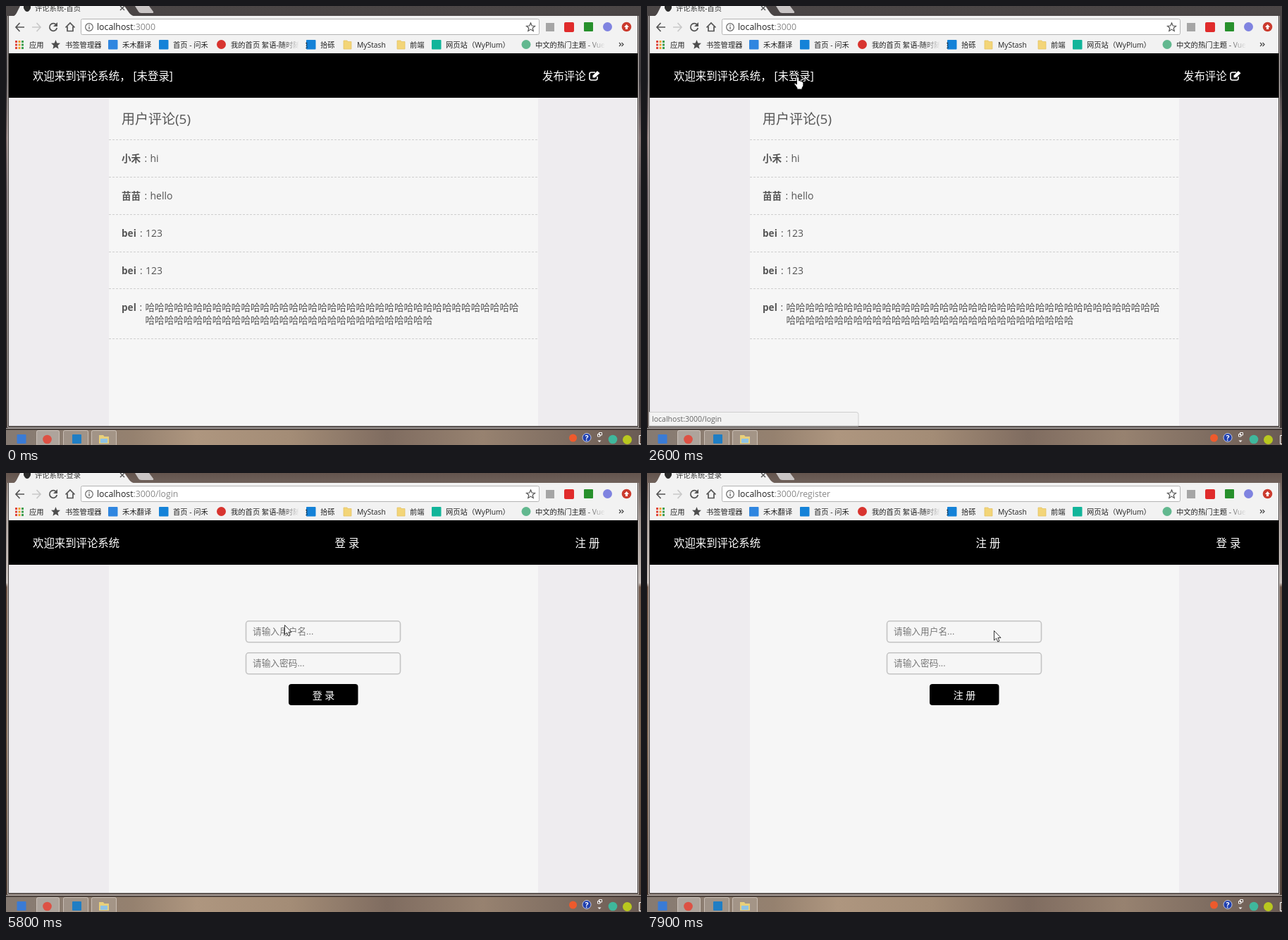
Animation of 901x622 px, one loop 8000 ms. Source, as an HTML page:

```html
<!DOCTYPE html>
<html lang="zh">
<head>
<meta charset="utf-8">
<style>
html, body { margin: 0; width: 100%; height: 100%; overflow: hidden; background: #4a423e; }
svg { display: block; width: 901px; height: 622px; }
text { font-family: 'Open Sans', 'Noto Sans CJK SC', 'Noto Sans CJK', sans-serif; white-space: pre; }
.bm { font-size: 10.3px; fill: #222; }
.head { font-size: 15.4px; fill: #fff; }
.list { font-size: 13.6px; fill: #555; }
.hint { font-size: 12.7px; fill: #777; }
.ico { fill: none; stroke: #555; stroke-width: 1.7; }
.mid { text-anchor: middle; }
</style>
</head>
<body>
<svg viewBox="0 0 901 622">
  <defs>
    <linearGradient id="sky1" x2="0" y2="1">
      <stop offset="0" stop-color="#4b4646"/><stop offset=".17" stop-color="#3d3a3d"/>
      <stop offset=".3" stop-color="#80706f"/><stop offset=".42" stop-color="#5e5457"/>
      <stop offset=".7" stop-color="#47403f"/><stop offset="1" stop-color="#3a3230"/>
    </linearGradient>
    <linearGradient id="sky2" x2="0" y2="1">
      <stop offset="0" stop-color="#63544d"/><stop offset=".1" stop-color="#9a8f8a"/>
      <stop offset=".25" stop-color="#c5bcb8"/><stop offset=".26" stop-color="#6b5447"/>
      <stop offset=".6" stop-color="#75604f"/><stop offset="1" stop-color="#4a3b33"/>
    </linearGradient>
    <linearGradient id="bar">
      <stop offset="0" stop-color="#857a72"/><stop offset=".2" stop-color="#95816f"/>
      <stop offset=".3" stop-color="#ae967f"/><stop offset=".45" stop-color="#a38c76"/>
      <stop offset=".6" stop-color="#7f6c60"/><stop offset=".75" stop-color="#978270"/>
      <stop offset="1" stop-color="#6a5b54"/>
    </linearGradient>
    <linearGradient id="fade">
      <stop offset="0" stop-color="#f2f2f2" stop-opacity="0"/><stop offset="1" stop-color="#f2f2f2"/>
    </linearGradient>
  </defs>

  <rect id="wall" width="901" height="622"/>

  <!-- window frame and tabs -->
  <path d="M3.500 14V595.500H896.500V14" fill="none" stroke="#3a3432"/>
  <path d="M2.500 14V597H897.500V14" fill="none" stroke="#e6e1de" stroke-opacity=".75"/>
  <path d="M9 15Q13 14 15 10L20 0H168L175 10Q178 14 184 15Z" fill="#f2f2f2"/>
  <path d="M183 0H203L209 8Q210 10 207 10H192Q189 10 188 8Z" fill="#c9c5c5"/>
  <path id="favicon" d="M25 0H35V3Q33 8 30 8Q27 8 25 3Z" fill="#2b2b2b"/>
  <path id="spin" d="M30 -2A5 5 0 1 1 25 3" fill="none" stroke="#4a7fd6" stroke-width="2"/>
  <text id="tab" x="41" y="6.800" font-size="10.3" fill="#333"></text>
  <path d="M162 0L168 6M168 0L162 6" stroke="#555" stroke-width="1.4"/>

  <!-- toolbar -->
  <rect x="4" y="14" width="892" height="53" fill="#f2f2f2"/>
  <rect x="106.5" y="18.5" width="650" height="22" rx="2" fill="#fff" stroke="#b3b3b3"/>
  <path class="ico" d="M26 30H14M19.500 24L14 30L19.500 36"/>
  <path class="ico" d="M37 30H49M43.500 24L49 30L43.500 36" style="stroke:#c9c9c9"/>
  <g id="reload"><path class="ico" d="M71.500 27A5.300 5.300 0 1 0 72.300 31"/><path d="M73 23V29H67Z" fill="#555"/></g>
  <path id="stop" class="ico" d="M62 25L72 35M72 25L62 35"/>
  <path class="ico" d="M84.500 30.500L91 24L97.500 30.500M87 29V35.500H95V29"/>
  <circle cx="118" cy="30" r="5.300" fill="none" stroke="#666" stroke-width="1.200"/>
  <path d="M118 29V33M118 26.500V28" stroke="#666" stroke-width="1.300"/>
  <text x="129" y="34" font-size="12.3" fill="#222">localhost<tspan id="url" fill="#888"></tspan></text>
  <path d="M744.500 24L746.200 28L750.500 28.400L747.200 31.200L748.200 35.400L744.500 33.100L740.800 35.400L741.800 31.200L738.500 28.400L742.800 28Z" fill="none" stroke="#555" stroke-width="1.200"/>
  <rect x="766" y="24" width="12" height="12" fill="#a5a5a5"/>
  <rect x="792" y="23" width="14" height="14" rx="2" fill="#e02b2b"/>
  <rect x="820" y="23" width="13" height="13" rx="1" fill="#27902c"/>
  <circle cx="853.500" cy="29.500" r="6.500" fill="#7f83e0"/>
  <circle cx="880.500" cy="29.500" r="6.800" fill="#cb3b2e"/>
  <path d="M880.500 26L884 30H882V33H879V30H877Z" fill="#fff"/>

  <!-- bookmarks -->
  <g id="apps"></g>
  <path d="M70.500 48L72.300 52.500L77 52.800L73.400 56L74.600 60.700L70.500 58.200L66.400 60.700L67.600 56L64 52.800L68.700 52.500Z" fill="#4d4d4d"/>
  <g id="marks"></g>
  <rect x="392" y="46" width="24" height="19" fill="url(#fade)"/>
  <rect x="415" y="46" width="10" height="19" fill="#f2f2f2"/>
  <rect x="822" y="46" width="28" height="19" fill="url(#fade)"/>
  <rect x="849" y="46" width="16" height="19" fill="#f2f2f2"/>
  <path d="M870 52L872.500 54.500L870 57M873.500 52L876 54.500L873.500 57" fill="none" stroke="#444" stroke-width="1.200"/>

  <!-- page -->
  <rect x="4" y="130" width="892" height="465" fill="#eeecef"/>
  <rect x="146" y="130" width="609" height="465" fill="#f6f6f6"/>
  <rect x="4" y="67" width="892" height="63"/>
  <text class="head" x="38" y="104.500">欢迎来到评论系统<tspan id="guest">， [未登录]</tspan></text>

  <g id="home">
    <text class="head" x="761" y="104.500">发布评论</text>
    <path d="M836 94H830.500Q828 94 828 96.500V102.500Q828 105 830.500 105H836.500Q839 105 839 102.500V100" fill="none" stroke="#fff" stroke-width="1.600"/>
    <path d="M832.500 101.500V98.500L839 92L842.500 95.200L835.700 101.500Z" fill="#fff"/>
    <text x="164" y="167" font-size="19" fill="#555">用户评论(5)</text>
    <g id="rows"></g>
  </g>

  <g id="form">
    <text id="title" class="head mid" x="484" y="104.500"></text>
    <text id="other" class="head mid" x="825" y="104.500"></text>
    <g fill="#f6f6f6" stroke="#c4c4c4" stroke-width="1.600">
      <rect x="340.500" y="209.800" width="219" height="30" rx="4"/>
      <rect x="340.500" y="254.800" width="219" height="30" rx="4"/>
    </g>
    <text class="hint" x="350" y="229">请输入用户名...</text>
    <text class="hint" x="350" y="274">请输入密码...</text>
    <rect id="caret" x="350" y="217" width="1" height="15"/>
    <rect x="401" y="299" width="98.500" height="30" rx="4"/>
    <text id="send" class="mid" x="450.500" y="319.500" font-size="14" fill="#fff"></text>
  </g>

  <g id="status">
    <path d="M3.500 595V575.500H297Q300 575.500 300 578.500V595Z" fill="#f2f2f2" stroke="#cfcfcf"/>
    <text id="link" x="7" y="589" font-size="10.550" fill="#666"></text>
  </g>

  <!-- taskbar -->
  <rect y="600" width="901" height="22" fill="url(#bar)"/>
  <path d="M0 598.500H901" stroke="#e6e1de" stroke-opacity=".7"/>
  <path d="M0 600H901" stroke="#2e2724"/>
  <g id="tasks"></g>
  <rect x="15.500" y="607" width="13" height="13" rx="1" fill="#3a7bd5"/>
  <circle cx="58.500" cy="614" r="6.300" fill="#dd5144"/>
  <rect x="94" y="607" width="13" height="13" rx="1" fill="#1f7ec4"/>
  <path d="M132 608H138L139.500 610H146V620H132Z" fill="#e8cf7a"/>
  <rect x="134" y="613" width="10" height="6" fill="#8fc3e4"/>
  <circle cx="804.500" cy="612" r="5.500" fill="#ee5a2c"/>
  <circle cx="824" cy="611.500" r="6" fill="#1f3fae" stroke="#dfe5f5" stroke-width=".8"/>
  <text class="mid" x="824" y="615.500" font-size="10.500" font-weight="700" fill="#fff">?</text>
  <path d="M841.500 604.500H845.500V608H841.500ZM839.500 606.500H843V610H839.500Z" fill="#5d4c43" stroke="#fff"/>
  <path d="M839.500 615.500H844.500L842 618Z" fill="#fff"/>
  <circle cx="861" cy="614" r="6.300" fill="#3fb79c"/>
  <circle cx="881.500" cy="614.500" r="6.500" fill="#b9c81f"/>
  <path d="M901 608.500H898.500V620.500H901" fill="none" stroke="#fff"/>

  <g id="pointer">
    <path id="arrow" d="M.5 .5V14L3.600 11.200L5.800 16L8 15L5.900 10.400H10Z" fill="#fff" stroke="#222" stroke-width=".9"/>
    <path id="hand" d="M-1.500 1.500Q0 -.5 1.500 1.500V6Q3 5 4 6.600Q5.300 5.800 6 7.400Q7.800 7 7.800 9V13L6 16V18H-1V16L-5 10.500Q-4.500 8.500 -1.500 11Z" fill="#fff" stroke="#111" stroke-width=".9"/>
    <path id="beam" d="M-3 -7H-1Q0 -7 0 -6Q0 -7 1 -7H3M0 -6V6M-3 7H-1Q0 7 0 6Q0 7 1 7H3" fill="none" stroke="#222"/>
  </g>
</svg>
<script>
const LOOP = 8000, STEP = 100;
const $ = id => document.getElementById(id);
const show = (id, on) => { $(id).style.display = on ? '' : 'none'; };
const put = (id, s) => { if ($(id).textContent !== s) $(id).textContent = s; };
const clamp = v => Math.max(0, Math.min(1, v));
const within = (t, a, b) => t >= a && t < b;

// static parts
const hues = ['#e0453a', '#f0a030', '#3f9f4f', '#3f7fd6'];
$('apps').innerHTML = Array.from({ length: 9 }, (_, i) =>
  `<rect x="${13 + i % 3 * 4.5}" y="${49 + (i / 3 | 0) * 4.5}" width="3" height="3" fill="${hues[(i + (i / 3 | 0)) % 4]}"/>`).join('');

const box = (x, c) => `<rect x="${x}" y="48" width="13.500" height="13.500" rx="1" fill="${c}"/>`;
const dot = (x, c) => `<circle cx="${x}" cy="54.500" r="6.500" fill="${c}"/>`;
const folder = x => `<path d="M${x} 49H${x + 5}L${x + 6} 50.500H${x + 11}V61H${x}Z" fill="#f3d578" stroke="#e3c060" stroke-width=".7"/>`;
const mark = (x, s) => `<text class="bm" x="${x}" y="58.500">${s}</text>`;
$('marks').innerHTML =
  box(145, '#2f86e0') + box(217, '#1482d8') + dot(305.5, '#d8342f') + box(426, '#1482d8') +
  folder(479) + folder(555) + box(604, '#12b59a') + dot(738, '#62b88f') +
  [[33, '应用'], [84, '书签管理器'], [165, '禾木翻译'], [237, '首页 - 问禾'], [319, '我的首页 絮语-随时随地'],
   [446, '拾砾'], [498, 'MyStash'], [573, '前端'], [624, '网页站（WyPlum）'], [751, '中文的热门主题 - Vue.js']]
    .map(m => mark(...m)).join('');

const ha = n => '哈'.repeat(n);
const rows = [
  [221, '小禾', 204.5, 'hi'], [274, '苗苗', 204.5, 'hello'], [327, 'bei', 198, '123'],
  [379.5, 'bei', 198, '123'], [432, 'pel', 197.5, ha(39)]
];
const line = y => `<path d="M146 ${y}H755" stroke="#cfcfcf" stroke-dasharray="3 2"/>`;
$('rows').innerHTML = rows.map(([y, who, x, s]) =>
  `<text class="list" x="164" y="${y}" font-weight="700">${who}</text>` +
  `<text class="list" x="${x - 8}" y="${y}">:</text>` +
  `<text class="list" x="${x}" y="${y}"${s[0] === '哈' ? '' : ' style="font-size:14px"'}>${s}</text>`).join('') +
  `<text class="list" x="197.500" y="450">${ha(30)}</text>` +
  [189.5, 242.5, 295.5, 348.5, 400.5, 471.5].map(line).join('');

$('tasks').innerHTML = [43, 81, 121].map((x, i) =>
  `<rect x="${x + .5}" y="601.500" width="${i ? 35 : 32}" height="22" rx="2" fill="#fff" fill-opacity="${i ? .16 : .3}" stroke="#e5dcd5" stroke-opacity=".65"/>`).join('');

// pointer path: time, x, y
const path = [
  [300, 888, 57], [400, 770, 84], [500, 620, 108], [600, 480, 124], [700, 409, 130], [900, 409, 130],
  [1000, 403, 140], [1100, 358, 194], [1200, 232, 206], [1500, 216, 155], [1800, 214, 100],
  [3000, 214, 100], [3300, 242, 118], [3500, 252, 125], [3600, 252, 125],
  [3800, 330, 163], [3900, 350, 190], [4100, 376.5, 222], [4200, 376.5, 222], [4300, 371.5, 221],
  [4500, 371.5, 221], [4600, 376.5, 221], [5700, 376.5, 221],
  [5800, 395, 215], [6100, 570, 178], [6200, 680, 140], [6400, 808, 91], [6600, 813, 101],
  [6900, 813, 101], [7200, 803, 111], [7300, 803, 111], [7600, 660, 170], [7900, 492, 223]
];
function at(t) {
  const i = path.findIndex(p => p[0] > t);
  if (i < 0) return path[path.length - 1].slice(1);
  const a = path[Math.max(0, i - 1)], b = path[i];
  const k = b === a ? 0 : (t - a[0]) / (b[0] - a[0]);
  return [a[1] + (b[1] - a[1]) * k, a[2] + (b[2] - a[2]) * k];
}

function draw(t) {
  const login = t >= 3400, register = t >= 7000;
  const loading = within(t, 2800, 3500) || within(t, 6800, 7200);

  $('wall').setAttribute('fill', t < 2700 ? 'url(#sky1)' : 'url(#sky2)');
  put('tab', '评论系统-' + (t < 3200 ? '首页' : '登录'));
  put('url', ':3000' + (register ? '/register' : t >= 3200 ? '/login' : ''));
  show('favicon', !loading);
  show('spin', loading);
  show('reload', !loading);
  show('stop', loading);
  $('spin').setAttribute('transform', `rotate(${(t - 3300) * .36} 30 3)`);

  show('home', !login);
  show('guest', !login);
  show('form', login);
  put('title', register ? '注 册' : '登 录');
  put('send', register ? '注 册' : '登 录');
  put('other', register ? '登 录' : '注 册');
  show('caret', within(t, 4300, 4800) || within(t, 5300, 5800));

  const alpha = t < 5000
    ? clamp((t - 1800) / 300) * clamp((3350 - t) / 300)
    : clamp((t - 6300) / 300) * clamp((7200 - t) / 300);
  $('status').setAttribute('opacity', alpha);
  put('link', 'localhost:3000/' + (t < 5000 ? 'login' : 'register'));

  const [x, y] = at(t);
  const hand = within(t, 1800, 3100), beam = within(t, 4100, 5800);
  show('pointer', t >= 300);
  show('hand', hand);
  show('beam', beam);
  show('arrow', !hand && !beam);
  $('pointer').setAttribute('transform', `translate(${x} ${y})`);
}

function tick() {
  draw(Math.floor(performance.now() % LOOP / STEP) * STEP);
  requestAnimationFrame(tick);
}
tick();
</script>
</body>
</html>
```
